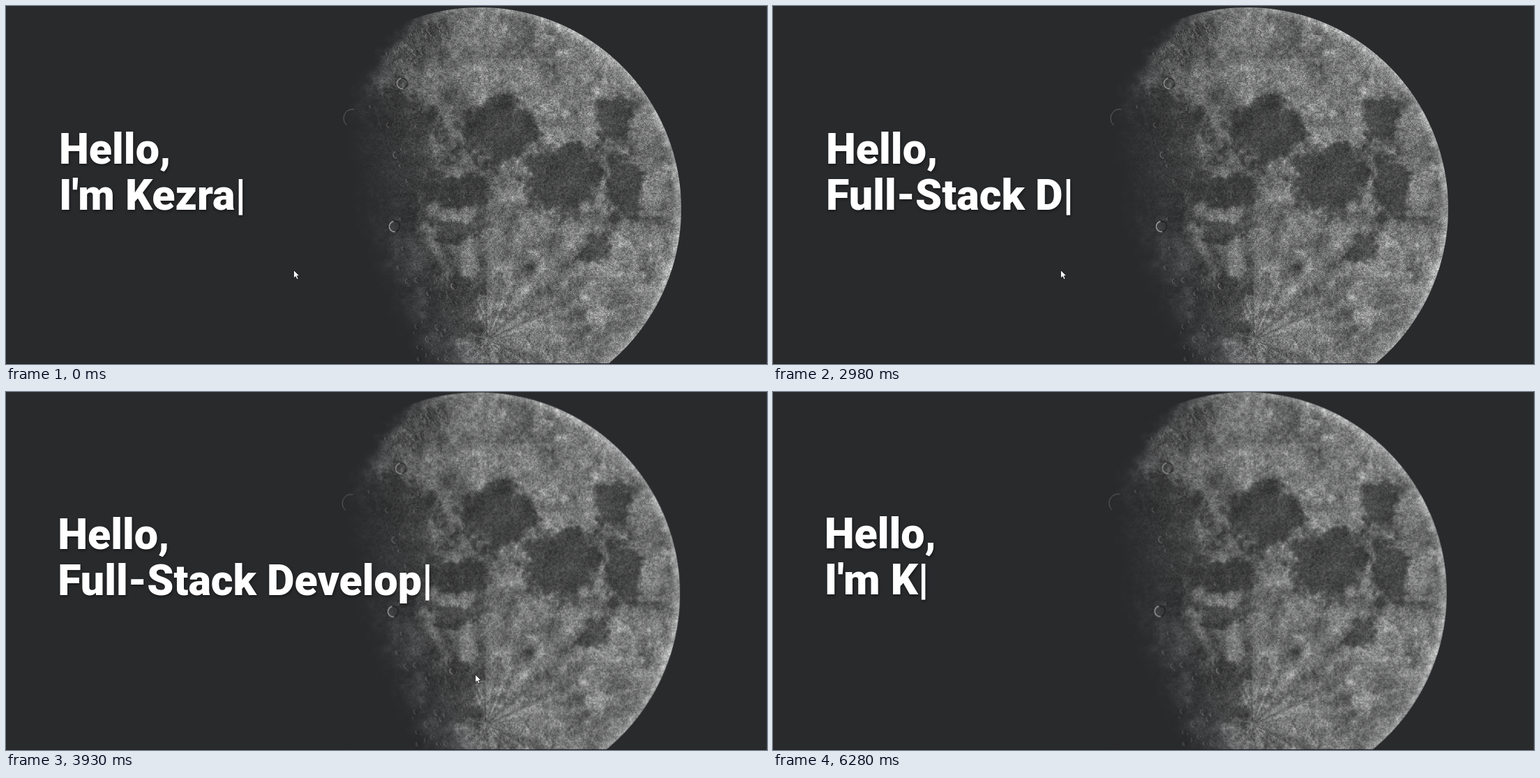
Recreate the animation shown at these times as an HTML page with a canvas. Size 1091x513 px, loop 6.38 s.

```html
<!DOCTYPE html>
<html lang="en">
<head>
<meta charset="utf-8">
<title>Hello</title>
<style>
html, body { margin: 0; width: 100%; height: 100%; overflow: hidden; background: #292a2c; }
canvas, svg { position: absolute; left: 0; top: 0; display: block; }
text {
  font: 900 61px Roboto, Arial, sans-serif;
  fill: #fff;
  white-space: pre;
}
#copy { filter: drop-shadow(1px 2px 2px rgba(0, 0, 0, .45)); }
</style>
</head>
<body>
<canvas id="stage" width="1091" height="513"></canvas>
<svg width="1091" height="513">
  <g id="copy">
    <text x="76" y="226">Hello,</text>
    <text id="typed" x="76" y="292"></text>
  </g>
  <path id="mouse" d="M0 0V11.6L2.7 9.1L4.6 13.2L6.6 12.3L4.8 8.3H8.4Z" fill="#fff" stroke="#111" stroke-width=".8"/>
</svg>
<script>
const W = 1091, H = 513, LOOP = 6380;
const NAME = "I'm Kezrali", JOB = 'Full-Stack Developer';
const ctx = document.getElementById('stage').getContext('2d');
const typed = document.getElementById('typed');
const copy = document.getElementById('copy');
const mouse = document.getElementById('mouse');

// Typing phases: start time, phrase, first length, last length, characters per step, step time
const phases = [
  [0, NAME, 9, 11, 1, 137],
  [1200, NAME, 6, 0, -5, 130],
  [1460, JOB, 1, 4, 1, 130],
  [2110, JOB, 5, 9, 1, 150],
  [2850, JOB, 10, 12, 2, 130],
  [3260, JOB, 13, 20, 1, 130],
  [5050, JOB, 18, 0, -5, 130],
  [5730, NAME, 1, 5, 1, 137]
];

const clamp = v => Math.max(0, Math.min(1, v));
const mix = (a, b, k) => a + (b - a) * k;
const smooth = (a, b, v) => { v = clamp((v - a) / (b - a)); return v * v * (3 - 2 * v); };

function lineAt(t) {
  const [start, phrase, first, last, step, time] = phases.filter(p => p[0] <= t).pop();
  const n = first + step * Math.floor((t - start) / time);
  return phrase.slice(0, step > 0 ? Math.min(n, last) : Math.max(n, last)) + '|';
}

let seed = 7;
function rand() {
  seed = (seed * 1664525 + 1013904223) >>> 0;
  return seed / 4294967296;
}

const lattice = Float32Array.from({ length: 65536 }, rand);
function noise(x, y) {
  const ix = Math.floor(x), iy = Math.floor(y);
  const fx = smooth(0, 1, x - ix), fy = smooth(0, 1, y - iy);
  const cell = (i, j) => lattice[((iy + j) & 255) * 256 + ((ix + i) & 255)];
  return mix(mix(cell(0, 0), cell(1, 0), fx), mix(cell(0, 1), cell(1, 1), fx), fy) - .5;
}
const fbm = (x, y) => [34, 17, 8, 4].reduce((sum, size, i) => sum + noise(x / size + i * 50, y / size) * .75 ** i, 0);

// Dark plains: x, y, radii
const plains = [
  [708, 178, 52, 46], [792, 245, 58, 54], [869, 160, 27, 33], [887, 258, 30, 44], [847, 347, 25, 24],
  [648, 266, 48, 22], [642, 322, 38, 18], [555, 215, 72, 100], [640, 440, 46, 45]
];
const moonX = 679, moonY = 290, moonR = 288.5;

// Left limit of the sunlit side
const fadeEdge = y => 487 + (y - 185) ** 2 * (y < 185 ? .0031 : .00098);

function moonTone(x, y) {
  const n = fbm(x, y);
  let tone = 70 + 46 * smooth(490, 780, x) + 42 * n;
  tone += 150 * Math.max(0, noise(x / 11 + 9, y / 11) - .22) * smooth(560, 760, x);

  // Streaks fanning out from the south
  const dx = x - 690, dy = y - 478, far = Math.hypot(dx, dy);
  tone += 46 * noise(Math.atan2(dy, dx) * 11 + 40, far / 160) * smooth(300, 60, far);

  let dark = 0;
  for (const [px, py, rx, ry] of plains) {
    const d = Math.hypot((x - px) / rx, (y - py) / ry);
    dark = Math.max(dark, smooth(1.25, .8, d + .42 * n));
  }
  return mix(tone, 56 + 8 * smooth(520, 720, x) + 14 * n, dark * .9);
}

function drawMoon() {
  const c = document.createElement('canvas');
  const left = 470, w = c.width = 510, h = c.height = 520;
  const g = c.getContext('2d'), img = g.createImageData(w, h);
  for (let y = 0; y < h; y++) {
    const edge = fadeEdge(y), width = 40 + 80 * smooth(50, 250, y);
    for (let i = 0; i < w; i++) {
      const x = i + left, r = Math.hypot(x - moonX, y - moonY);
      const grain = .28 * (rand() + rand() - 1) + .36 * noise(x / 2.2, y / 2.2);
      if (r > moonR + 1) continue;
      const lit = smooth(-8, width, x - edge + 16 * noise(x / 9, y / 9));
      let tone = moonTone(x, y) * (1 + grain);
      tone += 42 * smooth(moonR - 14, moonR - 1, r) * smooth(560, 740, x);
      tone = 41 + Math.max(0, tone - 41) * lit;
      img.data.set([tone, tone + 1 - lit * .6, tone + 3 - lit * 2, 255 * clamp(moonR + .5 - r)], (y * w + i) * 4);
    }
  }
  g.putImageData(img, 0, 0);
  g.translate(-left, 0);

  function crater(x, y, r, alpha) {
    g.lineWidth = Math.max(.8, r * .22);
    [[190, 1.4], [25, 4.55]].forEach(([tone, from]) => {
      g.strokeStyle = `rgba(${tone},${tone},${tone},${alpha})`;
      g.beginPath();
      g.arc(x, y, r, from, from + 3.1);
      g.stroke();
    });
  }
  crater(557, 316, 7.5, .7);
  crater(568, 111, 7.5, .6);
  // Rough ground along the sunlit limit, the northern rim and the south
  for (let i = 0; i < 260; i++) {
    const k = rand(), s = rand(), r = 1 + 3.5 * rand() ** 3;
    if (i % 8 == 0) crater(fadeEdge(480 * k) + 25 + 150 * s, 480 * k, r + .8, .45);
    else if (i % 3) crater(585 + 200 * k, 508 - 120 * s * s - 10 * k, r, .35);
    else crater(533 + 80 * k + 30 * s, 78 - 62 * k + 25 * s, r, .35);
  }

  // Curved ridge in the shade
  g.strokeStyle = 'rgba(150,150,150,.5)';
  g.lineWidth = 1;
  g.beginPath();
  g.arc(497, 161, 13, 2.3, 4.9);
  g.stroke();
  return c;
}

const moon = drawMoon();

function render(now) {
  const t = Math.max(0, now) % LOOP;
  // The pointer sweeps right in short hops, and the scene leans away from it
  const hop = 3650 + 140 * Math.floor((t - 3650) / 140);
  const sweep = smooth(3610, 4020, hop), gone = t >= 4340;
  const lean = sweep + (gone ? .1 : 0);
  const sx = -2.1 * lean, sy = -1.6 * lean;

  ctx.fillStyle = '#292a2c';
  ctx.fillRect(0, 0, W, H);
  ctx.drawImage(moon, 470 + sx, sy);
  ctx.fillStyle = '#212224';
  ctx.fillRect(0, H - 1, W, 1);
  ctx.fillStyle = '#38393b';
  ctx.fillRect(W - 1, 0, 1, H);

  const line = lineAt(t);
  if (typed.textContent !== line) typed.textContent = line;
  copy.setAttribute('transform', `translate(${sx} ${sy})`);
  mouse.setAttribute('transform', `translate(${412.5 + 297 * sweep} ${378.5 + 30 * sweep})`);
  mouse.setAttribute('visibility', gone ? 'hidden' : 'visible');
}

function frame(now) {
  render(now);
  requestAnimationFrame(frame);
}
render(0);
requestAnimationFrame(frame);
</script>
</body>
</html>
```
